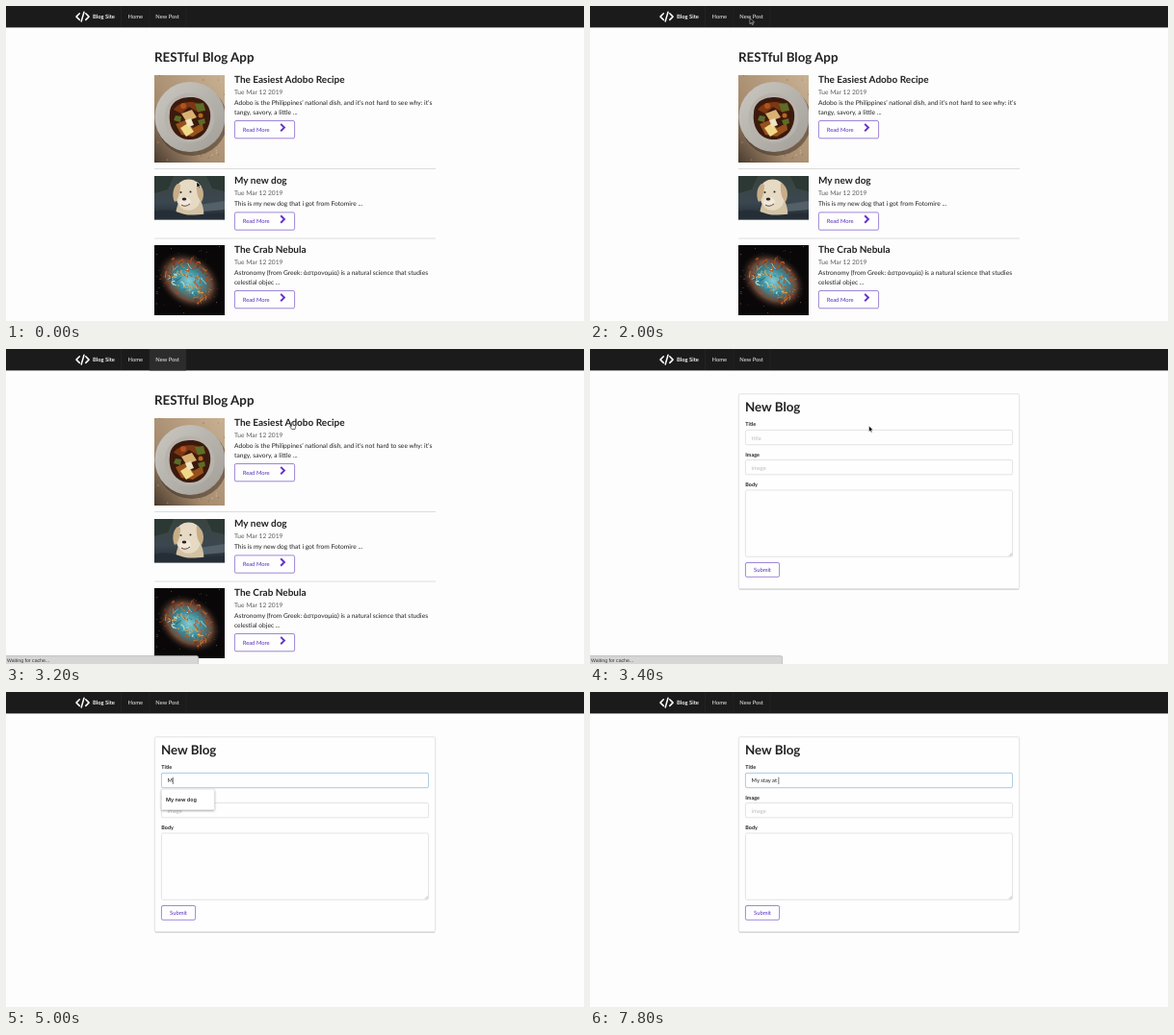
Write an HTML page that moves like this. It is 600 by 328 pixels and loops after 8000 ms.

```html
<!DOCTYPE html>
<html lang="en">
<head>
<meta charset="utf-8">
<title>Blog Site</title>
<style>
  html, body { margin: 0; width: 100%; height: 100%; overflow: hidden; background: #fdfdfd; }
  svg { display: block; width: 600px; height: 328px; }
  text { font: 5.83px Lato, sans-serif; fill: #212121; text-rendering: geometricPrecision; }
  .h1 { font-size: 13.33px; font-weight: 700; }
  .h2 { font-size: 10px; font-weight: 700; }
  .copy { font-size: 6.67px; }
  .meta { font-size: 6.67px; fill: #5c5c5c; }
  .nav { fill: #efefef; }
  .bold { font-weight: 700; }
  .label { font-size: 5.42px; font-weight: 700; }
  .hint { fill: #bdbdbd; }
  .violet { fill: #5a2fc0; }
  .status { font: 5.2px "Liberation Sans", Arial, sans-serif; fill: #333; }
  .option { font: 600 5.4px Inter, sans-serif; fill: #222; }
  .button { fill: #fefefe; stroke: #7f5fcb; stroke-width: .75; }
  .field { fill: #fefefe; stroke: #d9d9da; stroke-width: .7; }
  .focus { stroke: #85b7d9; }
  .rule { stroke: #d6d6d7; stroke-width: .8; }
  .thick { fill: none; stroke-linecap: round; stroke-linejoin: round; }
</style>
</head>
<body>
<svg viewBox="0 0 600 328" xmlns="http://www.w3.org/2000/svg">
  <defs>
    <linearGradient id="stone" x1="0" y1="1" x2="1" y2="0">
      <stop offset="0" stop-color="#493a2d"/>
      <stop offset=".35" stop-color="#a58a6d"/>
      <stop offset="1" stop-color="#c9b193"/>
    </linearGradient>
    <linearGradient id="plate" x1="0" y1="0" x2="1" y2="1">
      <stop offset="0" stop-color="#cbc8c2"/>
      <stop offset="1" stop-color="#a19d97"/>
    </linearGradient>
    <linearGradient id="road" x1="0" y1="0" x2="0" y2="1">
      <stop offset="0" stop-color="#39443f"/>
      <stop offset=".6" stop-color="#3b4750"/>
      <stop offset="1" stop-color="#20282f"/>
    </linearGradient>
    <radialGradient id="nebula">
      <stop offset="0" stop-color="#86cbd0"/>
      <stop offset=".4" stop-color="#398c9c"/>
      <stop offset=".68" stop-color="#6b4a38"/>
      <stop offset="1" stop-color="#080607" stop-opacity="0"/>
    </radialGradient>
    <clipPath id="c1"><rect x="154" y="72" width="73" height="91"/></clipPath>
    <clipPath id="c2"><rect x="154" y="177" width="73" height="45.5"/></clipPath>
    <clipPath id="c3"><rect x="154" y="249" width="73" height="73"/></clipPath>
    <filter id="soft"><feGaussianBlur stdDeviation=".5"/></filter>
    <filter id="shade" x="-10%" y="-20%" width="120%" height="150%">
      <feDropShadow dx="0" dy=".8" stdDeviation=".9" flood-opacity=".4"/>
    </filter>
  </defs>

  <rect width="600" height="328" fill="#fdfdfd"/>

  <rect width="600" height="22.4" fill="#1b1b1b"/>
  <rect id="hover" x="149" width="38" height="22.4" fill="#2c2c2d"/>
  <path d="M119.5 0V22M149 0V22M187 0V22" stroke="#2b2b2c" stroke-width=".6"/>
  <path class="thick" d="M76.3 7.8 73 11.1 76.3 14.4M82.8 7.8 86.1 11.1 82.8 14.4M81 6.2 78.2 16" stroke="#fff" stroke-width="1.5"/>
  <text class="nav bold" x="90" y="13.1">Blog Site</text>
  <text class="nav" x="126.6" y="13.1">Home</text>
  <text class="nav" x="155.3" y="13.1">New Post</text>

  <g id="list">
    <text class="h1" x="154" y="58">RESTful Blog App</text>

    <g clip-path="url(#c1)">
      <rect x="154" y="72" width="73" height="91" fill="url(#stone)"/>
      <g id="grit"></g>
      <g filter="url(#soft)">
        <circle cx="193" cy="119" r="37" fill="#3a2d22" opacity=".5"/>
        <circle cx="191" cy="115.500" r="36.500" fill="url(#plate)"/>
        <circle cx="190.500" cy="116.500" r="26" fill="#b7b3ac"/>
        <path d="M170 111C171 99 181 95 192 95C206 95 214 105 212 118C210 132 201 140 189 139C176 138 168 126 170 111Z" fill="#3b1a0d"/>
        <path d="M174 108C180 98 200 97 207 107L200 111 190 105 182 112Z" fill="#7c3713"/>
        <path d="M176 123 186 119 194 127 204 122 205 129 194 136 182 134Z" fill="#96501b"/>
        <path d="M182 112 193 108 198 116 187 120Z" fill="#d8b171"/>
        <path d="M181 127 189 122 195 131 187 136Z" fill="#f0d88a"/>
        <path d="M186 119 192 117 195 124 189 126Z" fill="#eee4c4"/>
        <path d="M196 102 205 101 207 109 199 110ZM176 114 182 115 181 121 174 119ZM199 119 206 117 207 122 201 124Z" fill="#5d6c27"/>
        <circle cx="184" cy="104" r="3" fill="#b3511d"/>
        <circle cx="202" cy="114" r="2.500" fill="#b8661f"/>
      </g>
    </g>

    <g clip-path="url(#c2)">
      <rect x="154" y="177" width="73" height="45.500" fill="url(#road)"/>
      <g filter="url(#soft)">
        <path d="M154 177H174L168 191 154 195ZM208 177H227V193L214 190Z" fill="#2c3833"/>
        <path d="M200 207 227 203V212L205 214Z" fill="#536068"/>
        <path d="M177 224C175 214 178 205 182 200H201C205 208 206 216 205 224Z" fill="#d3c2a4"/>
        <path d="M177 189C180 180 192 178 199 184C204 188 204 200 200 207C196 214 184 215 180 208C176 203 175 195 177 189Z" fill="#e6dac4"/>
        <path d="M178 185C173 189 172 198 175 204C179 203 181 193 181 186ZM198 184C205 187 207 197 203 204C199 201 197 192 198 184Z" fill="#c7ae87"/>
        <ellipse cx="186" cy="204" rx="6" ry="5" fill="#f1e8da"/>
        <ellipse cx="185" cy="201" rx="2.300" ry="1.600" fill="#28211f"/>
        <circle cx="181.500" cy="194" r="1" fill="#28211f"/>
        <circle cx="191.500" cy="193.500" r="1" fill="#28211f"/>
        <path d="M182 207Q186 210 191 206" fill="none" stroke="#5a423a" stroke-width="1"/>
        <path d="M154 214C170 210 178 215 186 217S215 215 227 216V223H154Z" fill="#252e36"/>
      </g>
    </g>

    <g clip-path="url(#c3)">
      <rect x="154" y="249" width="73" height="73" fill="#090708"/>
      <ellipse cx="190" cy="286" rx="37" ry="28" fill="url(#nebula)" transform="rotate(35 190 286)"/>
      <g id="threads" fill="none" stroke-linecap="round" filter="url(#soft)"></g>
      <g id="stars"></g>
    </g>

    <path class="rule" d="M154 169.500H446M154 242H446"/>
    <g id="posts"></g>
  </g>

  <g id="form">
    <rect x="154.300" y="46.800" width="291.400" height="203" rx="1.600" fill="#fefefe" stroke="#d4d4d5" stroke-width=".7"/>
    <path d="M155 250.300H445" stroke="#c9c9ca" stroke-width=".8"/>
    <text class="h1" x="161" y="65.300">New Blog</text>
    <text class="label" x="161.300" y="80.300">Title</text>
    <rect id="title" class="field" x="161.400" y="84.400" width="277.200" height="15.300" rx="1.600"/>
    <text id="hint" class="hint" x="167.600" y="94.500">title</text>
    <text id="typed" x="167.600" y="94.400"></text>
    <path id="caret" d="M0 88.700V96" stroke="#222" stroke-width=".6"/>
    <text class="label" x="161.300" y="111.600">Image</text>
    <rect class="field" x="161.400" y="115.500" width="277.200" height="15.300" rx="1.600"/>
    <text class="hint" x="167.600" y="125.700">image</text>
    <text class="label" x="161.300" y="142.800">Body</text>
    <rect class="field" x="161.400" y="147" width="277.200" height="69.300" rx="1.600"/>
    <path d="M435 215.500 438 212.500M436.800 215.500 438 214.300" stroke="#777" stroke-width=".5"/>
    <rect class="button" x="161.400" y="222.500" width="35.200" height="14.800" rx="1.600"/>
    <text class="violet" x="179" y="231.900" text-anchor="middle">Submit</text>
    <g id="menu">
      <rect id="panel" x="161.300" y="101.200" width="55" height="21.500" rx="1" fill="#fff" stroke="#d0d0d0" stroke-width=".4" filter="url(#shade)"/>
      <text class="option" x="166" y="113.800">My new dog</text>
      <text id="second" class="option" x="166" y="131.800">The Crab Nebula</text>
    </g>
  </g>

  <g id="status">
    <path d="M-1 329V319.600H198Q199.600 319.600 199.600 321.200V329Z" fill="#d6d6d6" stroke="#b2b2b2" stroke-width=".7"/>
    <text class="status" x="1" y="325.700">Waiting for cache...</text>
  </g>

  <g id="pointer">
    <path id="arrow" d="M0 0V6.200L1.500 4.900 2.500 7.100 3.500 6.600 2.500 4.500H4.500Z" fill="#000" stroke="#fff" stroke-width=".5"/>
    <path id="hand" d="M-.6 0Q.2-.9.9 0V2.700L3.200 3.200Q3.900 3.500 3.700 4.500L3 7H-.4L-2.300 4.200Q-2.200 3.200-.6 4.200Z" fill="#fff" stroke="#111" stroke-width=".6"/>
    <path id="beam" class="thick" d="M-1.300-3.300Q0-3.300 0-2.500Q0-3.300 1.300-3.300M0-2.500V2.500M-1.300 3.300Q0 3.300 0 2.500Q0 3.300 1.300 3.300" stroke="#222" stroke-width=".6"/>
  </g>
</svg>

<script>
const $ = id => document.getElementById(id);
const show = (id, on) => $(id).setAttribute('visibility', on ? 'visible' : 'hidden');

let seed = 7;
const rand = (lo, hi) => {
  seed = (seed * 16807) % 2147483647;
  return lo + (hi - lo) * seed / 2147483647;
};
const many = (n, make) => Array.from({ length: n }, make).join('');
const pick = list => list[Math.floor(rand(0, list.length))];

function post(top, title, lines) {
  const y = top + 37.4 + (lines.length - 1) * 9.6;
  return `<text class="h2" x="237" y="${top + 8}">${title}</text>
    <text class="meta" x="237" y="${top + 19.6}">Tue Mar 12 2019</text>` +
    lines.map((s, i) => `<text class="copy" x="237" y="${top + 31.3 + i * 9.6}">${s}</text>`).join('') +
    `<rect class="button" x="237.4" y="${y + .5}" width="62.2" height="18.3" rx="1.6"/>
    <text class="violet" x="245.7" y="${y + 11.6}">Read More</text>
    <path d="M285.2 ${y + 3.9}l3.7 3.7l-3.7 3.7" fill="none" stroke="#6435c9" stroke-width="2"/>`;
}

$('posts').innerHTML =
  post(72, 'The Easiest Adobo Recipe', [
    'Adobo is the Philippines’ national dish, and it’s not hard to see why: it’s',
    'tangy, savory, a little ...']) +
  post(177, 'My new dog', ['This is my new dog that i got from Fotomire ...']) +
  post(249, 'The Crab Nebula', [
    'Astronomy (from Greek: ἀστρονομία) is a natural science that studies',
    'celestial objec ...']);

$('grit').innerHTML = many(60, () =>
  `<circle cx="${rand(154, 227)}" cy="${rand(72, 163)}" r="${rand(.3, 1)}" fill="${pick(['#6b543f', '#d4bd9f'])}" opacity=".5"/>`);

// Filaments scattered in a tilted ellipse, warmer toward the rim
$('threads').innerHTML = many(80, () => {
  const a = rand(0, 6.283), r = Math.sqrt(rand(.02, 1));
  const u = 31 * r * Math.cos(a), v = 22 * r * Math.sin(a);
  const x = 190 + u * .82 - v * .57, y = 286 + u * .57 + v * .82;
  const color = pick(r > .65 ? ['#b04a1d', '#d67a2c', '#7e2e18'] : ['#e0a350', '#a9e0df', '#2d7485', '#b65a2a']);
  return `<path d="M${x} ${y}q${rand(-5, 5)} ${rand(-5, 5)} ${rand(-6, 6)} ${rand(-6, 6)}" stroke="${color}" stroke-width="${rand(.5, 1.3)}"/>`;
});
$('stars').innerHTML = many(45, () =>
  `<circle cx="${rand(154, 227)}" cy="${rand(249, 322)}" r="${rand(.15, .45)}" fill="#e4d8cd" opacity=".8"/>`);

// time, x, y
const path = [
  [0, 198, 183], [200, 222, 158], [400, 266, 108], [600, 236, 74], [800, 189, 51.5],
  [1000, 172, 28], [1200, 161, 13], [2000, 166, 12.5], [2200, 168, 11], [2400, 338, 58],
  [3200, 297, 76.5], [3400, 289.5, 80], [3800, 250, 86], [4200, 205, 92.5], [8000, 205, 92.5]
];
// time, shape
const shapes = [[0, 'arrow'], [800, 'beam'], [1000, 'arrow'], [2200, 'hand'], [3400, 'arrow'], [4000, 'beam'], [5000, '']];
const typing = [
  [0, ''], [5000, 'M'], [5200, 'My'], [5400, 'My '], [5600, 'My s'], [6000, 'My st'],
  [6200, 'My sta'], [6400, 'My stay'], [6600, 'My stay '], [7600, 'My stay a'], [7800, 'My stay at ']
];
const latest = (keys, t) => keys.filter(k => k[0] <= t).pop()[1];

function place(t) {
  const i = path.findIndex(p => p[0] > t);
  const [a, b] = [path[i - 1], path[i]];
  const k = (t - a[0]) / (b[0] - a[0]);
  return [a[1] + (b[1] - a[1]) * k, a[2] + (b[2] - a[2]) * k];
}

function draw(t) {
  const onForm = t >= 3400, focused = t >= 4200;
  show('list', !onForm);
  $('form').style.display = onForm ? '' : 'none';
  show('hover', t >= 2200 && !onForm);
  show('status', t >= 2600 && t < 3600);

  const shape = latest(shapes, t);
  for (const s of ['arrow', 'hand', 'beam']) show(s, s === shape);
  $('pointer').setAttribute('transform', `translate(${place(t)})`);

  const text = latest(typing, t).replaceAll(' ', '\u00a0');
  $('typed').textContent = text;
  show('hint', !text);
  $('title').classList.toggle('focus', focused);
  show('caret', focused && onForm && !(t >= 7200 && t < 7600));
  const width = text ? $('typed').getComputedTextLength() : 0;
  $('caret').setAttribute('transform', `translate(${167.9 + width})`);

  const full = t < 5000;
  $('menu').style.display = t >= 4800 && t < 5800 ? '' : 'none';
  $('menu').style.opacity = t >= 5600 ? .5 : 1;
  $('panel').setAttribute('height', full ? 39.5 : 21.5);
  $('second').style.display = full ? '' : 'none';
}

const start = performance.now();
function tick() {
  const t = (performance.now() - start) % 8000;
  draw(Math.floor(t / 200) * 200);
  requestAnimationFrame(tick);
}
tick();
</script>
</body>
</html>
```
